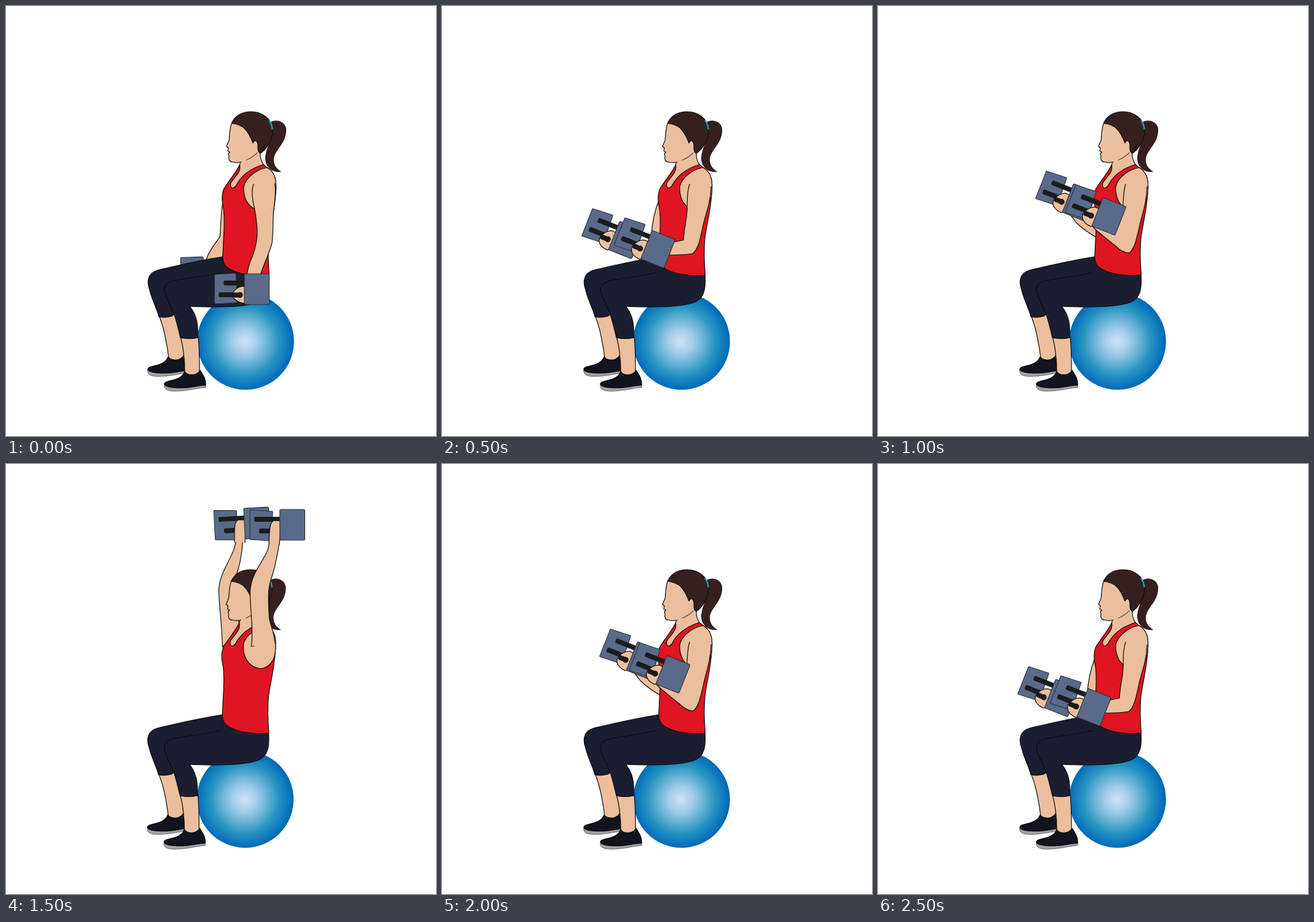
Animation of 700 by 700 pixels, one loop 3 s. Source, as an HTML page:

```html
<!DOCTYPE html>
<html lang="en">
<head>
<meta charset="utf-8">
<title>Exercise ball curl and press</title>
<style>
  html, body { margin: 0; width: 100%; height: 100%; overflow: hidden; background: #fff; }
  svg { display: block; width: 100vw; height: 100vh; }
  .skin { fill: #ebbf9d; }
  .red { fill: #e01521; }
  .navy { fill: #1a1e30; }
  .shoe { fill: #11131f; }
  .sole { fill: #a3a3a5; stroke: #3a3a3d; stroke-width: .7; }
  .hair { fill: #35201f; }
  .plate { fill: #5a6a8a; stroke: #2b2f36; stroke-width: 1.1; stroke-linejoin: round; }
  .bar { fill: #1b1c1e; }
  .line { stroke: #0b0b0b; stroke-width: 1.2; stroke-linecap: round; stroke-linejoin: round; }
  .open { fill: none; }
</style>
</head>
<body>
<svg viewBox="0 0 700 700" xmlns="http://www.w3.org/2000/svg">
  <defs>
    <radialGradient id="glow" gradientUnits="userSpaceOnUse" cx="389" cy="546" r="79">
      <stop offset="0" stop-color="#cfe2f7"/>
      <stop offset=".25" stop-color="#a3cdea"/>
      <stop offset=".5" stop-color="#60afd3"/>
      <stop offset=".7" stop-color="#2794c0"/>
      <stop offset=".85" stop-color="#1280c0"/>
      <stop offset="1" stop-color="#0068b5"/>
    </radialGradient>
    <g id="shoe">
      <path class="sole" d="M258 614C256 624 262 627 275 627C295 627 310 622 325 621L325 613Z"/>
      <path class="shoe line" d="M291 595C297 603 310 602 316 593C321 601 326 608 325 617.500C309 618 295 623 276 621.500C266 621 258 619 258 615C259 608 285 612 291 595Z"/>
    </g>
  </defs>
  <g id="stage">
    <circle cx="390" cy="546" r="78.8" fill="url(#glow)"/>
    <g id="far"></g>

    <g id="legs">
      <path class="skin line" d="M249 504C258 525 262 550 265 574L289 580L292 545L282 502Z"/>
      <use href="#shoe" x="-27" y="-24"/>
      <path class="navy line" d="M354 408C320 413 272 424 247 430C232 434 228 447 234 463C238 479 246 494 249 506Q260 508 270 505L300 480L380 440Z"/>
      <path class="skin line" d="M284 538C290 560 291 580 291 597Q304 606 315 596C315 575 315 560 313 538Z"/>
      <use href="#shoe"/>
      <path class="navy" d="M354 408L428 436C430 462 426 474 414 481C392 491 345 491 299 489C311 503 313 520 312 540Q298 543 284 540C280 525 277 508 271 495C264 480 258 470 258 462C258 453 266 449 275 447L349 434Z"/>
      <path class="open line" d="M428 436C430 462 426 474 414 481C392 491 345 491 299 489C311 503 313 520 312 540Q298 543 284 540C280 525 277 508 271 495C264 480 258 470 258 462C258 453 266 449 275 447C300 442 325 440 349 434"/>
    </g>

    <g id="torso">
      <path class="red line" d="M380 259C376 269 366 280 355 297C350 308 352 320 354 330C357 350 354 375 353.500 395C353 405 352 409 354 417C358 430 385 441 428.500 438C427 420 426 400 428 378C432 350 437 335 439 305C441 285 439 272 424 262L419 258Z"/>
      <path class="skin line" d="M380.500 259C383 272 370 280 366 288C364 296 369 299 374 293C383 275 400 264 419 258C414 250 414 246 414 236L382 250Z"/>
      <path class="skin line" d="M425 263C404 267 385 284 387 300C388 318 398 331 414 333C428 333 438 320 439 305C441 285 439 271 425 263Z"/>
    </g>

    <g id="head">
      <path class="hair" d="M431 189C438 184 453 186 456 199C458 224 437 233 436 250C436 260 441 265 448.500 270C432 272 421 261 422 246C424 226 436 216 433 200Z"/>
      <path class="skin" d="M368 189C364 200 364 212 363 219C361 224 359 227 359 229Q361 230 362 231L361 236L364 238L362 240Q363 243 363 245C362 250 364 254 369 254C380 256 389 254 396 248L414 238L412 200Z"/>
      <path class="open line" d="M367 192C364 200 364 212 363 219C361 224 359 227 359 229Q361 230 362 231L361 236L364.500 238L362 240Q363 243 363 245C362 250 364 254 369 254C375 255.500 379 255 383 254"/>
      <path class="open line" stroke-opacity=".6" d="M391 251Q401 247 409 239"/>
      <path class="hair line" d="M367 191C373 178 385 172 399 172C417 172 432 183 434 201C434 218 425 232 414 240Q410 238 410 231C411 220 406 216 402 223C399 215 395 206 388 199C382 194 375 192 367 191Z"/>
      <path class="open" stroke="#0fa0c8" stroke-width="2.400" d="M428 186Q433 192 433.500 201"/>
    </g>
    <g id="near"></g>
  </g>
</svg>
<script>
const el = id => document.getElementById(id);
const path = (cls, d) => `<path class="${cls}" d="${d}"/>`;
const limb = d => path("skin line", d);
const bar = (x, y, end = -18) => `<rect class="bar" x="${x}" y="${y}" width="${end - x}" height="8" rx="2.5"/>`;

// rise moves the rear plate and bars against the front plate.
const grips = {
  hang: { rise: 0, flip: 1, fist: "M-19-4C-28-7-38 2-40 8C-40 15-32 22-19 23" },
  curl: { rise: -4, flip: 1, fist: "M-18-4C-28-10-37 0-40 9C-43 18-35 26-22 26L-13 21" },
  press: { rise: 0, flip: -1, fist: "M-38-29C-37-15-38 4-30 7L-18 6L-21-31" }
};

// Local origin is the middle of the front plate.
function dumbbell(x, y, turn, grip) {
  const { rise, flip, fist } = grips[grip];
  const hand = limb(fist);
  const rear = path("plate", "M-68-24L-35-26Q-34-26-34-25L-32 21Q-32 22-33 22L-68 24Q-69 24-69 23L-69-23Q-69-24-68-24Z") +
    bar(-54, -14) + bar(-62, 5);
  const knob = bar(-40, 5.5, -26) + '<circle class="bar" cx="-27.5" cy="9.5" r="4.8"/>';
  return `<g transform="translate(${x} ${y}) rotate(${turn}) scale(1 ${flip})">` +
    `<g transform="translate(0 ${rise})">${rear}</g>` + hand + (flip > 0 ? knob : "") +
    '<rect class="plate" x="-20.3" y="-25" width="40.6" height="50" rx="2"/></g>';
}

const poses = {
  rest: {
    far: '<rect class="plate" x="284" y="409" width="37" height="40" rx="2" transform="rotate(-2 302 409)"/>' +
      limb("M353 318C349 345 350 360 348 376C338 390 330 400 326 413L365 413L362 325"),
    near: limb("M403 290C397 308 405 325 407 345C411 372 408 388 402 405C396 418 393 428 391 445L412 445C417 425 427 408 433 386C436 365 433 348 437 322C438 310 440 300 437.5 289") +
      dumbbell(408.3, 461, 0, "hang")
  },
  curl: {
    far: limb("M353 316C347 332 342 350 341 372L335 390L362 390L362 325") + dumbbell(299, 381, 21.5, "curl"),
    near: limb("M403 290C396 312 402 325 397 350Q394 366 393 381L374 385L364 405Q390 406 408 403C417 397 420 380 424 362C428 340 437 325 438 294") +
      dumbbell(351.6, 396, 21.5, "curl")
  },
  lift: {
    far: limb("M305 330Q315 342 323 353Q338 367 358 378L360 325") + dumbbell(328, 320, 21.5, "curl"),
    near: limb("M403 290C397 310 402 325 394 350L350 342L347 357C362 372 373 379 386 390Q398 402 409 402C418 395 421 378 425 362C429 340 437 325 438 294") +
      dumbbell(376, 342.5, 21.5, "curl")
  },
  press: {
    far: limb("M375 122C374 150 348 172 347 206C348 238 352 260 353 298L376 275L380 258L366 200C376 183 383 165 386 126") +
      dumbbell(409, 96, -3, "press"),
    near: limb("M429 127C429 152 399 172 398 208C398 242 404 267 400 297L438 292C439 276 430 263 429 248C428 226 426 206 432 188C440 165 442 148 445.500 129") +
      path("skin", "M401 296L438 302L438 288L403 280Z") +
      dumbbell(466.7, 99, 0, "press")
  }
};

const cycle = ["rest", "curl", "lift", "press", "lift", "curl"];
const hold = 500;
let shown = "";

function draw(ms) {
  const name = cycle[Math.floor(ms / hold) % cycle.length];
  if (name === shown) return;
  shown = name;
  el("far").innerHTML = poses[name].far;
  el("near").innerHTML = poses[name].near;
  el("stage").setAttribute("transform", `translate(${name === "press" ? -0.6 : 0} 0)`);
}

const start = performance.now();
function tick() {
  draw(performance.now() - start);
  requestAnimationFrame(tick);
}
tick();
</script>
</body>
</html>
```
